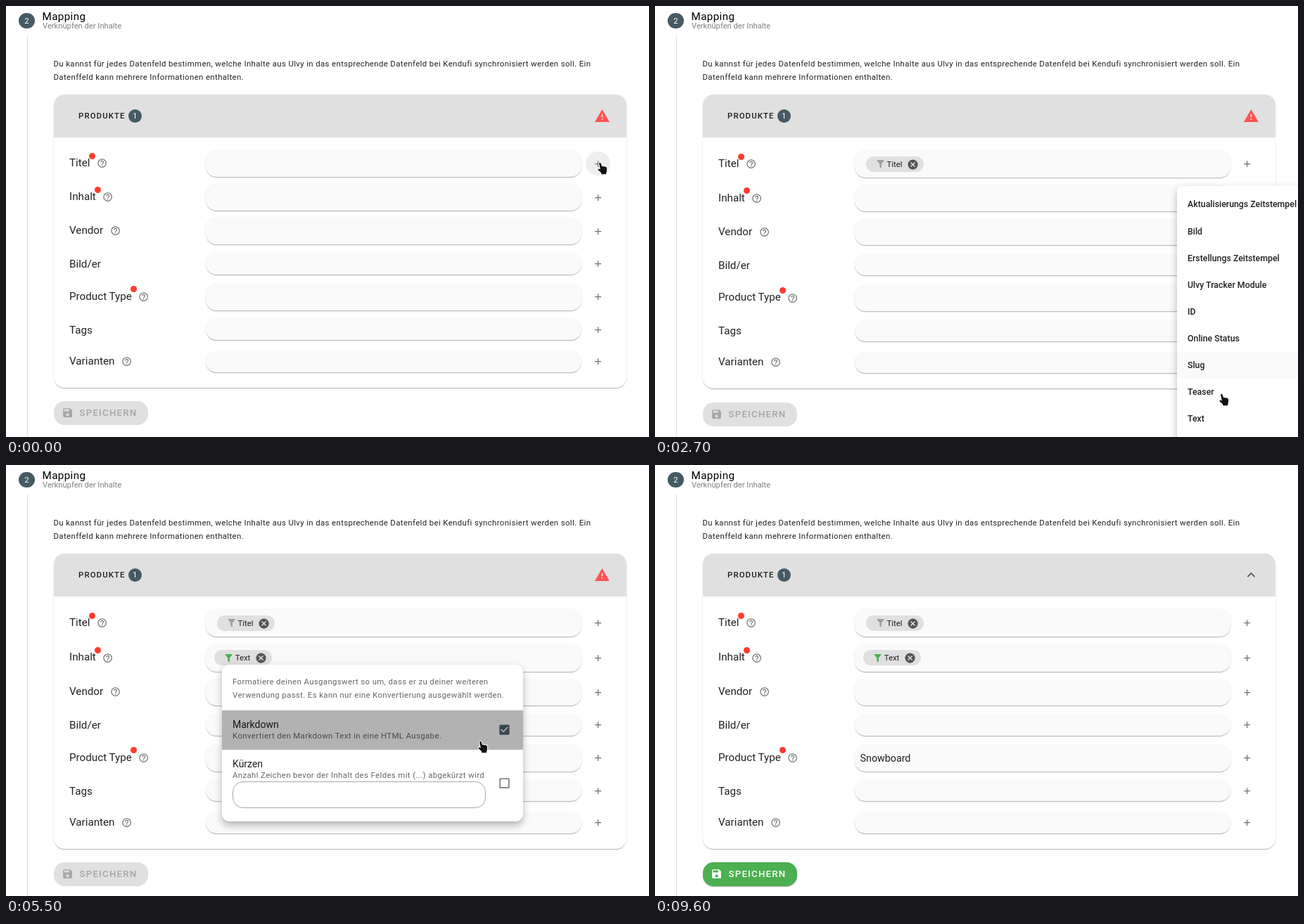
These frames come from a looping animation (914x613 px, 9.7 s). An HTML page:

```html
<!DOCTYPE html>
<html lang="de">
<head>
<meta charset="utf-8">
<title>Mapping</title>
<style>
html, body { margin: 0; width: 100%; height: 100%; overflow: hidden; background: #fff; }
#stage { position: absolute; left: 0; top: 0; width: 914px; height: 613px; overflow: hidden; font-family: Roboto, sans-serif; color: rgba(0,0,0,.87); }
#stage * { position: absolute; box-sizing: border-box; }
#stage span { white-space: pre; line-height: 20px; }
#stage svg * { position: static; }
.low { box-shadow: 0 2px 1px -1px rgba(0,0,0,.15), 0 1px 1px rgba(0,0,0,.1), 0 1px 3px rgba(0,0,0,.1); }
.mid { box-shadow: 0 3px 1px -2px rgba(0,0,0,.16), 0 2px 2px rgba(0,0,0,.1), 0 1px 5px rgba(0,0,0,.1); }
.high { box-shadow: 0 4px 5px -3px rgba(0,0,0,.16), 0 7px 9px 1px rgba(0,0,0,.11), 0 3px 12px 2px rgba(0,0,0,.1); }
.cap { font-size: 11.4px; letter-spacing: .38px; }
.soft { color: rgba(0,0,0,.6); }
.label { font-size: 15.2px; }
.big { font-size: 14.25px; }
.small { font-size: 11.4px; }
.option { font-size: 14px; }
.item { font-size: 12.35px; font-weight: 500; }
</style>
</head>
<body>
<div id="stage"></div>
<script>
const LOOP = 9700, STEP = 100, SLATE = '#455a64', GREEN = '#4caf50', RED = '#ff5252';
const ICON = {
  plus: 'M19 13H13V19H11V13H5V11H11V5H13V11H19Z',
  help: 'M11 18H13V16H11ZM12 2A10 10 0 1 0 12 22A10 10 0 1 0 12 2M12 20A8 8 0 1 1 12 4A8 8 0 1 1 12 20M12 6A4 4 0 0 0 8 10H10A2 2 0 0 1 14 10C14 12 11 11.75 11 15H13C13 12.75 16 12.5 16 10A4 4 0 0 0 12 6Z',
  filter: 'M14 12V20Q13.5 21.5 12.3 20.7L10 18.5V12L4.2 4.6Q3.8 3.4 5 3H19Q20.2 3.4 19.8 4.6Z',
  close: 'M12 2A10 10 0 1 1 12 22A10 10 0 1 1 12 2M15.6 7L12 10.6L8.4 7L7 8.4L10.6 12L7 15.6L8.4 17L12 13.4L15.6 17L17 15.6L13.4 12L17 8.4Z',
  save: 'M15 9H5V5H15M12 19A3 3 0 1 1 12 13A3 3 0 1 1 12 19M17 3H5A2 2 0 0 0 3 5V19A2 2 0 0 0 5 21H19A2 2 0 0 0 21 19V7Z',
  alert: 'M13 14H11V9H13M13 18H11V16H13M1 21H23L12 2Z',
  chevron: 'M7.4 8.6L12 13.2L16.6 8.6L18 10L12 16L6 10Z',
  unchecked: 'M4 3H20Q21 3 21 4V20Q21 21 20 21H4Q3 21 3 20V4Q3 3 4 3M5 5V19H19V5Z',
  checked: 'M5 3H19A2 2 0 0 1 21 5V19A2 2 0 0 1 19 21H5A2 2 0 0 1 3 19V5A2 2 0 0 1 5 3M10 17L19 8L17.6 6.6L10 14.2L6.4 10.6L5 12Z'
};
// label, help x, required, top, height
const ROWS = [
  ['Titel', 136.5, 1, 205.4, 37.6], ['Inhalt', 144.8, 1, 253.3, 37.6],
  ['Vendor', 155.2, 0, 301.3, 37.6], ['Bild/er', 0, 0, 351.4, 30.4],
  ['Product Type', 195.8, 1, 395, 37.6], ['Tags', 0, 0, 445, 30.4], ['Varianten', 171.4, 0, 490.5, 30.4]
];
const ITEMS = ['Aktualisierungs Zeitstempel', 'Bild', 'Erstellungs Zeitstempel', 'Ulvy Tracker Module', 'ID',
  'Online Status', 'Slug', 'Teaser', 'Text', 'Titel', 'Unique ID'];
// pointer: time, x, y of the hot spot
const PATH = [
  [400, 844, 222], [1200, 822, 572], [1500, 822, 572], [1900, 844, 272], [2200, 844, 272], [2700, 805, 551],
  [3000, 809, 577], [3300, 810, 578], [3900, 354, 268], [4200, 313, 274], [4600, 312, 274], [5300, 674, 392],
  [5600, 674, 392], [6100, 890, 440], [6500, 604, 441], [7100, 551, 417], [8800, 551, 417], [8900, 455, 305]
];
const KEYS = [7500, 7600, 7700, 7900, 8100, 8200, 8300, 8400, 8600];
const CARETS = [300, 308, 316, 327, 335, 343, 351, 356, 363];

const ramp = (t, a, b) => Math.min(1, Math.max(0, (t - a) / (b - a)));
const ease = u => u * u * (3 - 2 * u);
const within = (t, a, b) => t >= a && t < b;
const black = a => `rgba(0,0,0,${a})`;

const box = (x, y, w, h, css, cls = '', inner = '') =>
  `<div class="${cls}" style="left:${x}px;top:${y}px;width:${w}px;height:${h}px;${css}">${inner}</div>`;
const disc = (x, y, r, color) => box(x - r, y - r, 2 * r, 2 * r, `border-radius:50%;background:${color}`);
const text = (x, y, str, cls, css = '') => `<span class="${cls}" style="left:${x}px;top:${y - 10}px;${css}">${str}</span>`;
const icon = (name, x, y, size, color, turn = 0) =>
  `<svg viewBox="0 0 24 24" style="left:${x - size / 2}px;top:${y - size / 2}px;width:${size}px;height:${size}px;transform:rotate(${turn}deg)"><path fill-rule="evenodd" fill="${color}" d="${ICON[name]}"/></svg>`;
const caret = (x, y, h) => box(x, y, 1, h, 'background:#000');
const badge = (x, y, r, str) => disc(x, y, r, SLATE) +
  box(x - r, y - 10, 2 * r, 20, 'color:#fff;line-height:20px;text-align:center', 'small', str);

function pointerAt(t) {
  const n = PATH.findIndex(k => k[0] > t);
  if (n < 0) return PATH[PATH.length - 1].slice(1);
  if (!n) return PATH[0].slice(1);
  const [a, b] = [PATH[n - 1], PATH[n]], u = ease(ramp(t, a[0], b[0]));
  return [a[1] + (b[1] - a[1]) * u, a[2] + (b[2] - a[2]) * u];
}

function pointer(t) {
  if (t >= 9000) return '';
  const [x, y] = pointerAt(t);
  const draw = (dx, dy, d, attr) =>
    `<svg width="20" height="24" style="left:${x - dx}px;top:${y - dy}px"><path d="${d}" ${attr}/></svg>`;
  const solid = 'fill="#111" stroke="#fff" stroke-width="2" stroke-linejoin="round" paint-order="stroke"';
  if (t >= 6900) return draw(10, 7.5, 'M7 .7Q10 .7 10 2.5V13.5Q10 15.3 7 15.3M13 .7Q10 .7 10 2.5M13 15.3Q10 15.3 10 13.5M8.5 9.5H11.5', 'fill="none" stroke="#444" stroke-width="1.1"');
  if (t >= 5900) return draw(1, 1, 'M1 1V16L4.6 12.8L7 18L9.4 17L7.1 11.9H12Z', solid);
  return draw(4, 1.5, 'M3 2.6Q4 1 5.4 2.4L7.2 6.9L12.2 7.5Q14.2 8 14.2 10.4L13.8 14.5L12.8 18.2H6.5L5.6 15.8L1.8 12.5Q1 10.7 2.6 10.6L4.8 11.6Z', solid);
}

function chip(x, y, label, filter, bg) {
  return box(x, y - 11.2, 82, 22.4, `border-radius:12px;background:${bg}`) +
    icon('filter', x + 20.7, y, 15.2, filter) + text(x + 29.7, y, label, 'small') +
    icon('close', x + 66.4, y + .3, 17.1, '#555');
}

function menu(t, top, open, close, chosen, click) {
  const shown = ramp(t, open - 100, open + 200), alpha = shown * (1 - ramp(t, close, close + 300));
  if (!alpha) return '';
  const itemAt = time => Math.floor((pointerAt(time)[1] - top - 7.6) / 38.05);
  const [px, py] = pointerAt(t), now = itemAt(t), before = itemAt(t - 100);
  const list = ITEMS.map((name, i) => {
    const y = 7.6 + 38.05 * i;
    const tint = i == now && i == before ? .07 : i == before ? .02 : 0;
    const r = 32 + ramp(t, click, click + 200) * 80;
    const ripple = i == chosen && t >= click ? disc(px - 742, py - top - y + 1, r, black(.16)) : '';
    return box(0, y, 200, 38.05, `overflow:hidden;background:${black(tint)}`, '', ripple) + text(15, y + 18.6, name, 'item');
  }).join('');
  return box(742, top, 200, 434, `border-radius:8px;background:#fff;opacity:${alpha};transform-origin:0 0;transform:scale(${.6 + .4 * ease(shown)})`, 'high', list);
}

function popup(t) {
  const shown = ramp(t, 4500, 4800), alpha = shown * (1 - ramp(t, 6100, 6400));
  if (!alpha) return '';
  const on = t >= 5400;
  const tint = t < 5100 ? 0 : !on ? .05 : .12 + .18 * (1 - ramp(t, 5500, 5800));
  return box(307, 284, 428, 223, `border-radius:11px;background:#fff;opacity:${alpha};transform-origin:0 0;transform:scale(${.6 + .4 * ease(shown)})`, 'high',
    text(15, 24, 'Formatiere deinen Ausgangswert so um, dass er zu deiner weiteren', 'cap soft') +
    text(15, 43, 'Verwendung passt. Es kann nur eine Konvertierung ausgewählt werden.', 'cap soft') +
    box(0, 65, 428, 56, `background:${black(tint)}`) +
    text(15, 84.5, 'Markdown', 'option') +
    text(15, 101.3, 'Konvertiert den Markdown Text in eine HTML Ausgabe.', 'cap soft') +
    icon(on ? 'checked' : 'unchecked', 401.3, 92.5, 19, on ? '#37474f' : '#757575') +
    text(15, 140.5, 'Kürzen', 'option') +
    text(15, 157.3, 'Anzahl Zeichen bevor der Inhalt des Feldes mit (...) abgekürzt wird', 'cap soft') +
    box(15, 166, 360, 38, 'border:1px solid #a6a6a6;border-radius:15px') +
    icon('unchecked', 401.3, 168.5, 19, '#757575'));
}

function rows(t, grow) {
  let shift = 0;
  return ROWS.map(([name, help, required, top, h], i) => {
    const extra = grow[i] || 0, y = top + shift, mid = y + (h + extra) / 2;
    shift += extra;
    const hover = i == 0 && t < 600 || i == 1 && within(t, 1900, 2300);
    return box(284, y, 533.5, h + extra, 'border-radius:15.2px;background:#fafafa', 'low') +
      text(90, mid + (help ? -1 : .4), name, 'label') +
      (help ? icon('help', help, mid - .2, 15.2, '#757575') : '') +
      (required ? disc(help - 14.3, mid - 10.9, 4.5, '#ff3b30') : '') +
      (hover ? disc(841.5, mid - .3, 17.3, '#eee') : '') + icon('plus', 841.4, mid, 15.2, '#6f6f6f');
  }).join('');
}

function typed(t) {
  const n = KEYS.filter(k => t >= k).length;
  const wave = n == 1 ? 'text-decoration:underline wavy #f00 1px' : '';
  const bar = within(t, 7100, 9200) ? caret(n ? CARETS[n - 1] : 292, 408, 18) : '';
  return text(291.6, 417, 'Snowboard'.slice(0, n), 'big', wave) + bar;
}

function render(t) {
  const first = t >= 1600, second = t >= 3500, valid = t >= 7500;
  const grow = [first ? 1.5 : 0, second ? 1.5 : 0], shift = grow[0] + grow[1];
  const fade = ramp(t, 7500, 7800), mix = (a, b) => Math.round(a + (b - a) * fade);
  const chevronColor = `rgb(${mix(239, 97)},${mix(83, 97)},${mix(80, 97)})`;
  const ink = valid ? '#fff' : black(.26), by = 579 + shift;
  return box(29.5, 42, 1, 571, 'background:#dedede') +
    badge(29.5, 21, 11.4, '2') +
    text(51.5, 15, 'Mapping', 'label', 'letter-spacing:.38px;color:#000') +
    text(52, 28.5, 'Verknüpfen der Inhalte', '', 'font-size:11.2px;color:' + black(.5)) +
    text(67.5, 81.5, 'Du kannst für jedes Datenfeld bestimmen, welche Inhalte aus Ulvy in das entsprechende Datenfeld bei Kendufi synchronisiert werden soll. Ein', 'cap') +
    text(67.5, 100.5, 'Datenffeld kann mehrere Informationen enthalten.', 'cap') +
    box(67.5, 126, 814.5, 416.5 + shift, 'border-radius:15.2px;background:#fff', 'low',
      box(0, 0, 814.5, 60.5, 'border-radius:15.2px 15.2px 0 0;background:#e0e0e0')) +
    text(103, 156, 'PRODUKTE', 'small', 'font-weight:500;letter-spacing:1.12px') +
    badge(183.3, 156, 9.5, '1') +
    (valid ? icon('chevron', 847.3, 156, 22.8, chevronColor, -180 * ramp(t, 7400, 7650))
           : icon('alert', 847.3, 156, 22.8, RED)) +
    rows(t, grow) +
    (first ? chip(299.8, 224.8, 'Titel', '#9e9e9e', '#e0e0e0') : '') +
    (within(t, 1600, 2100) ? caret(382, 213, 22) : '') +
    (second ? chip(296, 274.2, 'Text', t >= 5400 ? GREEN : '#9e9e9e', within(t, 3800, 4100) ? '#d4d4d4' : '#e0e0e0') : '') +
    (within(t, 3500, 4600) ? caret(377.5, 263, 22) : '') +
    typed(t) +
    box(67.5, by - 17, 134, 34, `border-radius:15.2px;background:${valid ? GREEN : '#e0e0e0'}`, valid ? 'low' : '') +
    icon('save', 87.6, by, 17.1, t < 7600 ? (valid ? 'rgba(140,140,140,.55)' : black(.26)) : '#fff') +
    text(104.5, by, 'SPEICHERN', '', `font-size:13.3px;font-weight:500;letter-spacing:1.187px;color:${ink}`) +
    menu(t, 207, 400, 1500, 9, 1400) +
    menu(t, 256.3, 2100, 3400, 8, 3300) +
    popup(t) + pointer(t);
}

const stage = document.getElementById('stage');
let last = -1;
function tick() {
  const t = Math.floor(performance.now() % LOOP / STEP) * STEP;
  if (t != last) stage.innerHTML = render(last = t);
  requestAnimationFrame(tick);
}
tick();
</script>
</body>
</html>
```
